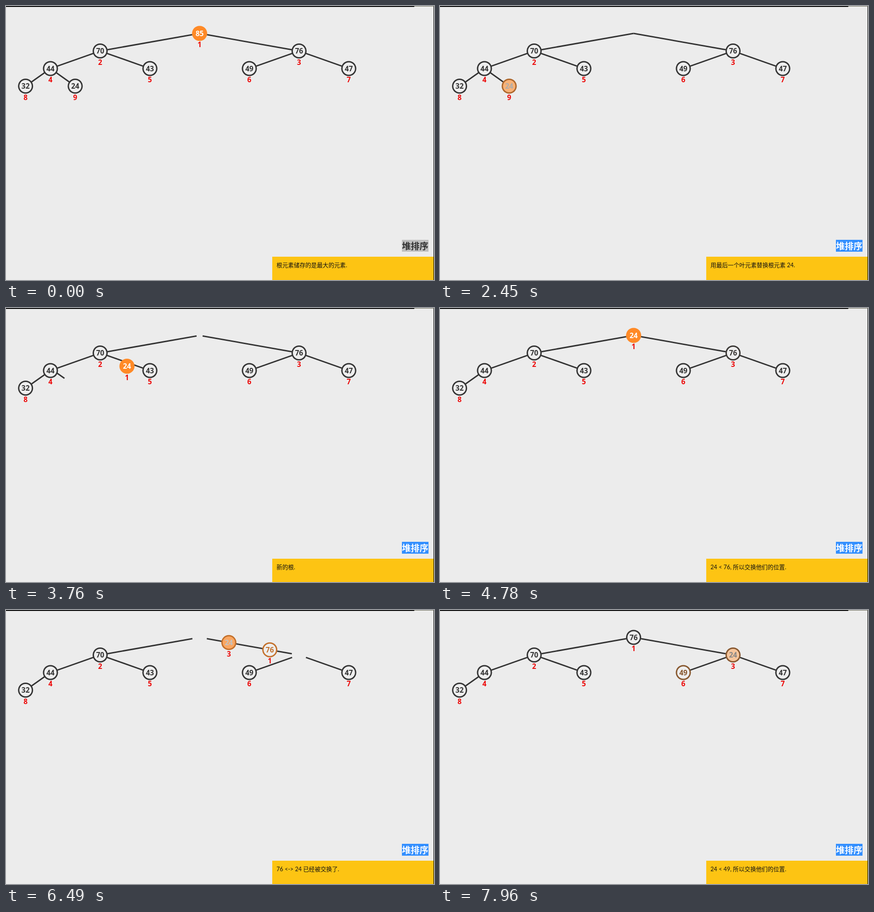
These frames come from a looping animation (934x600 px, 8000 ms). An HTML page:

```html
<!DOCTYPE html>
<html lang="zh">
<head>
<meta charset="utf-8">
<title>堆排序</title>
<style>
  html, body { margin: 0; width: 100%; height: 100%; overflow: hidden; background: #ececec; }
  svg { display: block; width: 934px; height: 600px; }
  #edges path { stroke: #333; stroke-width: 3; fill: none; }
  #nodes text { font: 700 15.5px "Open Sans", "Noto Sans", sans-serif; text-anchor: middle; }
  #nodes .label { fill: #ec0707; }
  #title { font: 700 19.3px "Noto Sans CJK SC", "Noto Sans CJK", sans-serif; fill: #333; }
  #select { fill: #c0c0c0; }
  .focus #title { fill: #fff; }
  .focus #select { fill: #338fff; }
  #status { font: 12.6px Lato, "Noto Sans CJK SC", "Noto Sans CJK", sans-serif; fill: #111; white-space: pre; }
</style>
</head>
<body>
<svg id="stage" viewBox="0 0 934 600">
  <rect width="934" height="600" fill="#ececec"/>
  <rect width="891" height="2"/>
  <rect x="891" width="43" height="1" fill="#6b6b58"/>
  <g id="edges"></g>
  <g id="nodes"></g>
  <rect id="select" x="864" y="512" width="58" height="26"/>
  <text id="title" x="864" y="533">堆排序</text>
  <rect x="581" y="549" width="352" height="51" fill="#fdc413"/>
  <text id="status" x="590.3" y="571.7"></text>
  <rect x="933" y="1" width="1" height="599"/>
</svg>
<script>
const LOOP = 8000, START = 300, STEP = 1401, FOCUS = 200, R = 16;

const slots = [null,
  [422.5, 60], [205.5, 98.5], [639.5, 98.5],
  [97, 137], [314, 137], [531, 137], [748, 137],
  [42.7, 175.5], [151, 175.5]];

const status = [
  '根元素储存的是最大的元素.',
  '取出根元素.',
  '用最后一个叶元素替换根元素 24.',
  '新的根.',
  '24 < 76, 所以交换他们的位置.',
  '76 <-> 24 已经被交换了.',
  '24 < 49, 所以交换他们的位置.'];

// Fill, ring and text colour of each look
const BG = [238, 238, 238], DARK = [51, 51, 51], ORANGE = [255, 138, 39], WHITE = [255, 255, 255];
const looks = { p: [BG, DARK, DARK], o: [BG, ORANGE, ORANGE], f: [ORANGE, ORANGE, WHITE] };

// Slot, look and size (0 or 1) of each node, one character per step
const still = (value, slot, look = 'ppppppp') =>
  ({ value, slot: String(slot).repeat(7), look, size: '1111111' });
const nodes = [
  still(70, 2), still(44, 4), still(43, 5), still(49, 6, 'ppppppo'),
  still(47, 7), still(32, 8),
  { value: 85, slot: '1111111', look: 'fffffff', size: '1000000' },
  { value: 76, slot: '3333311', look: 'ppppopp', size: '1111111' },
  { value: 24, slot: '9991133', look: 'ppfffpf', size: '1111111' }];

const rootTrim = [R, 0, 0, R, R, R, R];

const $ = id => document.getElementById(id);
const add = (parent, tag, attrs = {}) => {
  const el = document.createElementNS('http://www.w3.org/2000/svg', tag);
  set(el, attrs);
  return parent.appendChild(el);
};
const set = (el, attrs) => { for (const k in attrs) el.setAttribute(k, attrs[k]); };
const mix = (a, b, k) => a + (b - a) * k;
const mixAll = (a, b, k) => a.map((v, i) => mix(v, b[i], k));
const rgb = c => `rgb(${c.map(Math.round)})`;
const ease = u => u < .5 ? 4 * u ** 3 : 1 - 4 * (1 - u) ** 3;

for (const n of nodes) {
  n.g = add($('nodes'), 'g');
  n.ring = add(n.g, 'circle');
  n.core = add(n.g, 'circle');
  n.text = add(n.g, 'text', { y: 5.5 });
  n.label = add(n.g, 'text', { y: 30.3, class: 'label' });
  n.text.textContent = n.value;
}
const edges = [];
for (let i = 2; i < 10; i++) edges[i] = add($('edges'), 'path');

// Both ends of the edge above slot i, cut back to the circles
function ends(i, trim) {
  const [ax, ay] = slots[i >> 1], [bx, by] = slots[i];
  const d = Math.hypot(bx - ax, by - ay), ux = (bx - ax) / d, uy = (by - ay) / d;
  return [ax + ux * trim, ay + uy * trim, bx - ux * R, by - uy * R];
}

function drawNode(n, from, to, k) {
  const [x, y] = mixAll(slots[n.slot[from]], slots[n.slot[to]], k);
  const size = mix(+n.size[from], +n.size[to], k);
  const [core, ring, text] = looks[n.look[from]].map((c, i) => rgb(mixAll(c, looks[n.look[to]][i], k)));
  set(n.g, { transform: `translate(${x} ${y})`, visibility: size > .001 ? 'visible' : 'hidden' });
  set(n.ring, { r: 16.5 * size, fill: ring });
  set(n.core, { r: 13.5 * size, fill: core });
  n.text.style.fill = text;
  n.text.style.fontSize = n.label.style.fontSize = 15.5 * size + 'px';
  n.label.textContent = n.slot[to];
}

function draw(t) {
  const to = t < START ? 0 : Math.floor((t - START) / STEP) + 1;
  const from = Math.max(0, to - 1);
  const k = to ? ease((t - START) / STEP - from) : 0;

  $('stage').classList.toggle('focus', t >= FOCUS);
  $('status').textContent = status[to];
  nodes.forEach(n => drawNode(n, from, to, k));

  const trim = mix(rootTrim[from], rootTrim[to], k);
  for (let i = 2; i < 10; i++) {
    let p = ends(i, i < 4 ? trim : R);
    if (i === 9 && to > 2) {
      const x = slots[4][0] + R, y = slots[4][1];
      p = mixAll(p, [x, y, x, y], to === 3 ? k : 1);
    }
    set(edges[i], { d: `M${p[0]} ${p[1]}L${p[2]} ${p[3]}` });
  }
}

const begin = performance.now();
function tick() {
  draw((performance.now() - begin) % LOOP);
  requestAnimationFrame(tick);
}
tick();
</script>
</body>
</html>
```
